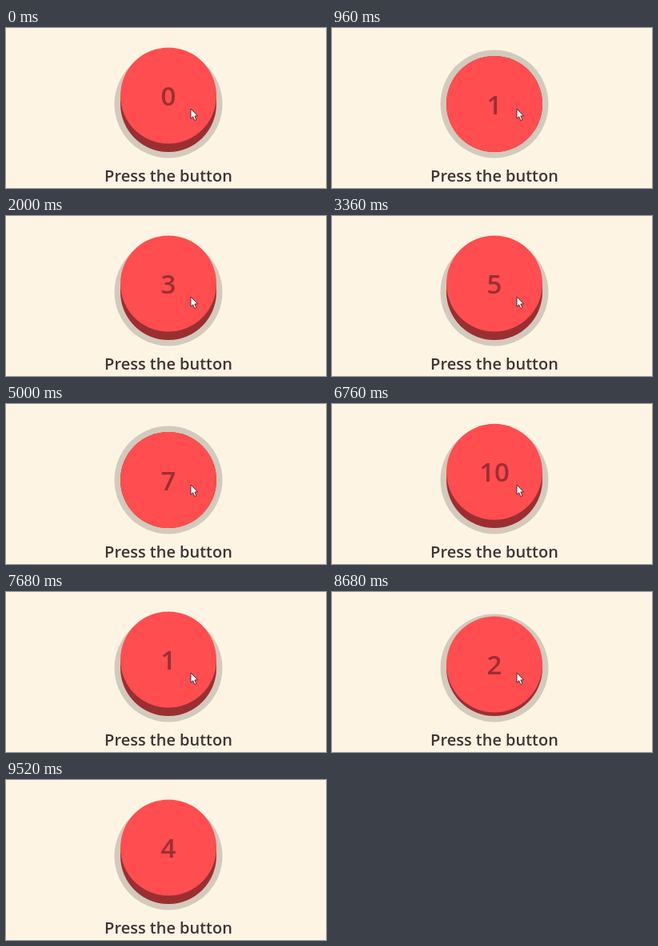
Write an HTML page with a canvas that moves like this. It is 400x200 px and loops after 9.64 s.

```html
<!DOCTYPE html>
<html lang="en">
<head>
<meta charset="utf-8">
<title>Press the button</title>
<style>
  html, body { margin: 0; width: 400px; height: 200px; overflow: hidden; background: #fdf4e4; }
  canvas { display: block; }
</style>
</head>
<body>
<canvas id="stage" width="400" height="200"></canvas>
<script>
const ctx = document.getElementById('stage').getContext('2d');
const LOOP = 9640, STEP = 40;
const COLORS = { page: '#fdf4e4', ring: '#d2cabc', side: '#9a2f31', top: '#ff4d50', count: '#9a2f31', label: '#423433' };
const FONT = '"Open Sans", "Noto Sans", sans-serif';
const CX = 203, BASE_Y = 95, RADIUS = 60, TRAVEL = 10.5;

// Each press: moment the button goes down, moment it is fully up again.
const PRESSES = [
  [200, 520], [880, 1160], [1640, 2000], [2400, 2880], [3120, 3360],
  [3760, 4080], [4360, 4600], [4920, 5280], [5440, 5680], [6120, 6400],
  [6760, 7160], [7320, 7680], [8280, 8520], [8640, 8880], [9240, 9440]
];
const MOVE = 80;
const CURSOR_LEAVES = 9440, CURSOR_GONE = 9520;

// Eased 0..1 progress of a move that starts at `start`.
function ease(t, start) {
  if (t < start) return 0;
  const p = Math.min(1, (t - start + 10) / (MOVE + 10));
  return p * p * (3 - 2 * p);
}

function stateAt(t) {
  let depth = 0, clicks = 0;
  for (const [down, up] of PRESSES) {
    const release = up - MOVE;
    depth += ease(t, down) - ease(t, release);
    if (t >= release) clicks++;
  }
  return { depth, count: clicks % 11 };
}

function disc(y, r, color) {
  ctx.fillStyle = color;
  ctx.beginPath();
  ctx.arc(CX, y, r, 0, Math.PI * 2);
  ctx.fill();
}

function text(str, y, size, color) {
  ctx.font = `600 ${size}px ${FONT}`;
  ctx.textAlign = 'center';
  ctx.fillStyle = color;
  ctx.fillText(str, CX, y);
}

function cursor(t) {
  if (t >= CURSOR_GONE) return;
  const away = Math.max(0, (t - CURSOR_LEAVES) / STEP);
  ctx.save();
  ctx.translate(231 + 68 * away, 101 + 20 * away);
  ctx.beginPath();
  [[0, 0], [0, 12.2], [2.7, 9.8], [4.8, 14.6], [6.9, 13.7], [4.9, 9], [8.5, 8.8]]
    .forEach(([x, y]) => ctx.lineTo(x, y));
  ctx.closePath();
  ctx.fillStyle = '#fff';
  ctx.fill();
  ctx.lineWidth = 0.9;
  ctx.strokeStyle = '#3a2226';
  ctx.stroke();
  ctx.restore();
}

function draw(t) {
  const { depth, count } = stateAt(t);
  const lift = TRAVEL * (1 - depth);
  const topY = BASE_Y - lift;

  ctx.fillStyle = COLORS.page;
  ctx.fillRect(0, 0, 400, 200);
  disc(BASE_Y, 67.5, COLORS.ring);
  disc(BASE_Y, RADIUS, COLORS.side);
  ctx.fillRect(CX - RADIUS, topY, RADIUS * 2, lift);
  disc(topY, RADIUS, COLORS.top);
  text(String(count), topY + 12.5, 33, COLORS.count);
  text('Press the button', 192, 20, COLORS.label);
  cursor(t);
}

function frame() {
  const t = performance.now() % LOOP;
  draw(Math.floor(t / STEP) * STEP);
  requestAnimationFrame(frame);
}
frame();
</script>
</body>
</html>
```
